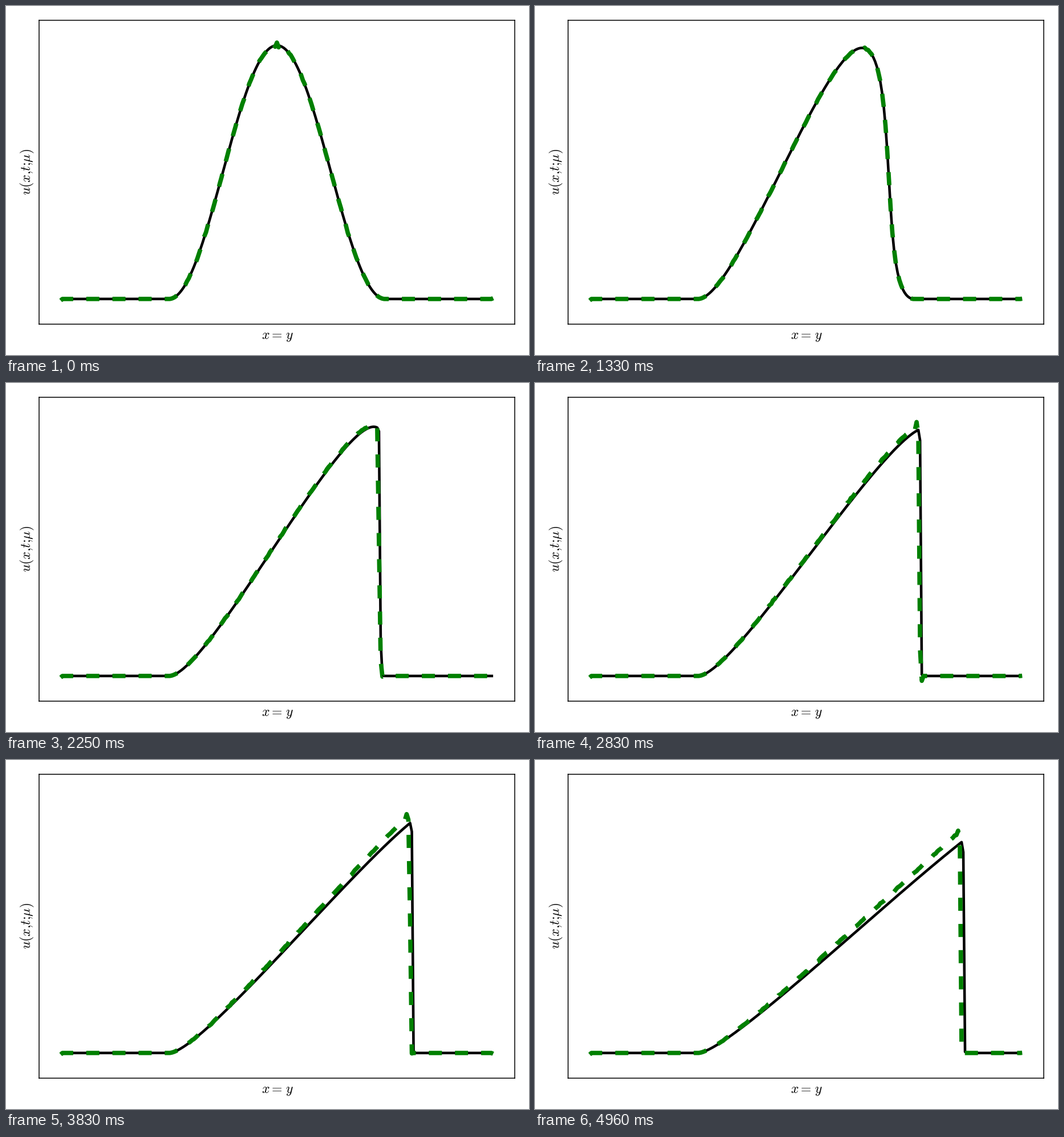
A matplotlib script that plays this animation: 917 by 611 pixels, repeating every 5000 ms.

```python
import numpy as np
import matplotlib.pyplot as plt
from matplotlib.animation import FuncAnimation

W, H, DPI = 917, 611, 96
FRAMES, LOOP_MS = 120, 5000
LEFT, RIGHT, TOP, BOTTOM = 58, 892, 24.6, 557.3
PT = 72 / DPI  # points per pixel

plt.rcParams["mathtext.fontset"] = "cm"


def solve(n=750, substeps=10, t_end=0.508, drag=0.04):
    """Upwind Burgers flow of a sine-squared bump, one row per frame."""
    x = np.linspace(0, 1, n + 1)
    dt = t_end / FRAMES / substeps
    u = np.where(abs(x - 0.5) < 0.25, np.sin(2 * np.pi * (x - 0.25)) ** 2, 0)
    rows = []
    for _ in range(FRAMES):
        rows.append(u[::3].copy())
        for _ in range(substeps):
            flux = np.diff(u**2 / 2, prepend=0) * n
            u = u - dt * (flux + drag * u)
    return x[::3], np.array(rows)


x, exact = solve()
wobble = np.random.default_rng(4).normal(size=(FRAMES // 4 + 2, x.size))


def noise(k):
    i, w = k // 4, k % 4 / 4
    return (1 - w) * wobble[i] + w * wobble[i + 1]


def reduced(k):
    """Reduced model: too high on the ramp, late at the shock, ringing crest."""
    grow = np.clip((k - 45) / 75, 0, 1)
    surge = np.exp(-(((k - 74) / 14) ** 2))
    crest_x = x[np.argmax(exact[k])]
    lag = 0.008 * grow**0.7 * (x / crest_x) ** 10
    u = (1 + 0.045 * grow) * np.interp(x + lag, x, exact[k])

    crest = np.argmax(u)
    d = np.arange(x.size) - crest
    ring = 0.004 + 0.007 * np.exp(-k / 3) + 0.006 * grow + 0.018 * surge
    width = 1 + 2 * np.exp(-k / 20)
    behind = (d <= 0) | (grow == 0)
    g = u + 0.0015 * noise(k) * np.clip(8 * u, 0, 1)
    g += ring * (-1.0) ** d * np.exp(-abs(d) / width) * behind

    foot = crest + np.argmax(u[crest:] < 0.02)
    g[foot] -= 0.025 * surge
    g[0] -= 0.006
    g[-1] += 0.004 * np.clip(noise(k)[-1], -1, 1)
    return g


fig = plt.figure(figsize=(W / DPI, H / DPI), dpi=DPI, facecolor="white")
ax = fig.add_axes([LEFT / W, 1 - BOTTOM / H,
                   (RIGHT - LEFT) / W, (BOTTOM - TOP) / H])
ax.set(xlim=(-0.05, 1.05), ylim=(-0.1, 1.1), xticks=[], yticks=[])
for spine in ax.spines.values():
    spine.set_linewidth(1.53 * PT)

full, = ax.plot(x, exact[0], color="black", lw=4.58 * PT,
                solid_capstyle="butt")
rom, = ax.plot(x, reduced(0), color="green", lw=7.64 * PT,
               linestyle=(0, (3, 3)), dash_capstyle="butt")


def label(px, py, text, angle=0):
    fig.text(px / W, 1 - py / H, text, size=23.7 * PT, rotation=angle,
             rotation_mode="anchor", ha="center", va="baseline")


label(476, 583.5, r"$x=\hspace{0.1}y$")
label(43, 290.5, r"$u(x,\hspace{-0.2}t;\hspace{-0.2}\mu)$", 90)


def update(k):
    full.set_ydata(exact[k])
    rom.set_ydata(reduced(k))
    return full, rom


anim = FuncAnimation(fig, update, frames=FRAMES, interval=LOOP_MS / FRAMES,
                     repeat=True, repeat_delay=0)
plt.show()
```
